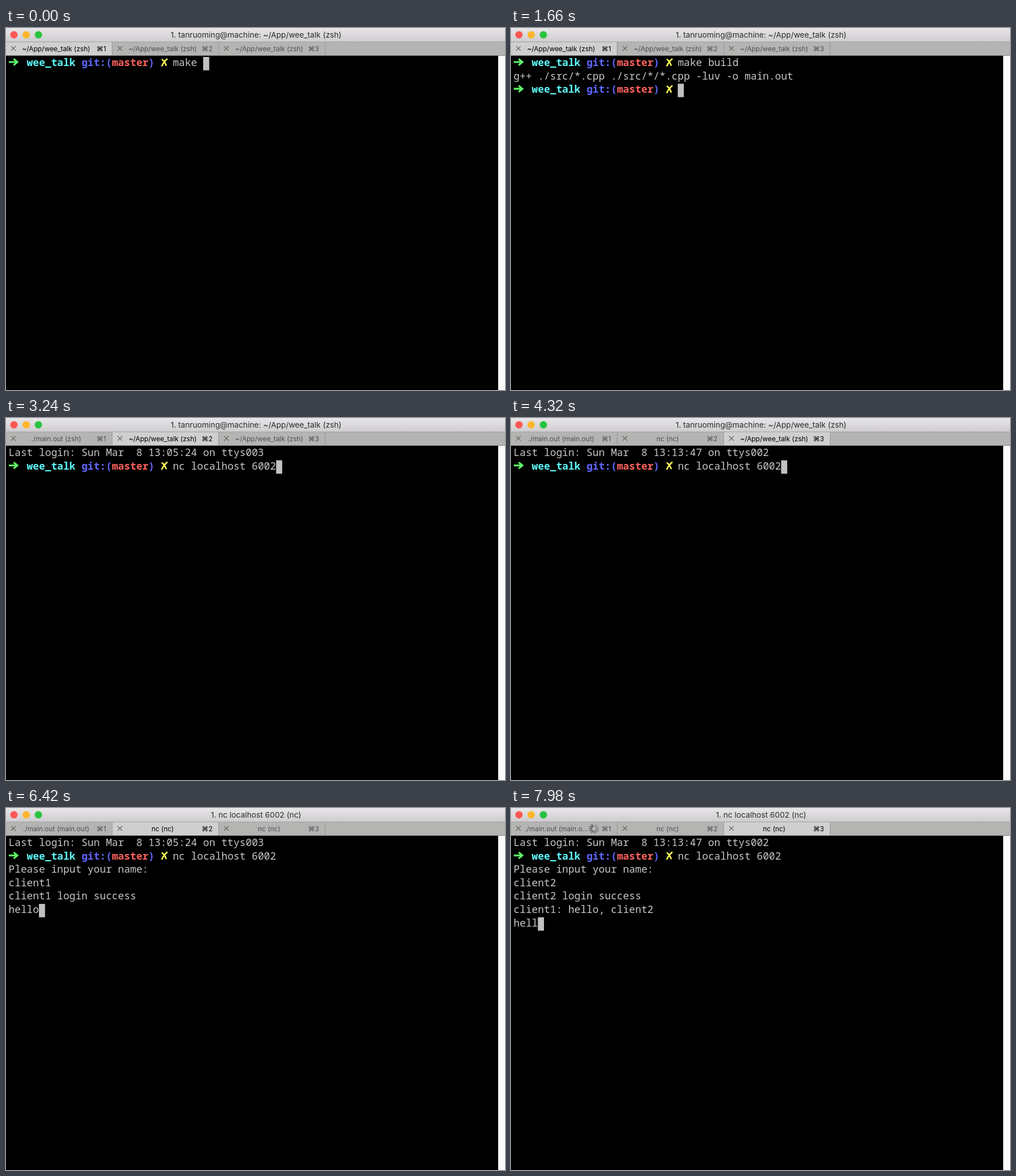
Animation of 878 by 638 pixels, one loop 8000 ms. Source, as an HTML page:

```html
<!DOCTYPE html>
<html lang="en">
<head>
<meta charset="utf-8">
<title>Terminal chat</title>
<style>
  html, body { margin: 0; width: 100%; height: 100%; overflow: hidden; background: #000; }
  svg { display: block; width: 100%; height: 100%; }
  text { white-space: pre; }
  .ui { font-family: Inter, "DejaVu Sans", sans-serif; font-size: 11.9px; }
  .title { font-size: 13.7px; fill: #2c2c2c; }
  .mono { font-family: "Noto Sans Mono", "DejaVu Sans Mono", monospace; font-size: 17.83px; fill: #c7c7c7; }
  .bold { font-weight: 700; }
</style>
</head>
<body>
<svg viewBox="0 0 878 638" preserveAspectRatio="none">
  <defs>
    <linearGradient id="bar" x1="0" y1="0" x2="0" y2="1">
      <stop offset="0" stop-color="#e8e6e8"/>
      <stop offset="1" stop-color="#cecccf"/>
    </linearGradient>
  </defs>
  <rect width="878" height="638"/>
  <rect width="878" height="24" fill="url(#bar)"/>
  <circle cx="14" cy="12" r="6.5" fill="#fc5753"/>
  <circle cx="35.5" cy="12" r="6.5" fill="#fdb62c"/>
  <circle cx="57" cy="12" r="6.5" fill="#29c440"/>
  <rect y="24" width="878" height="25" fill="#b4b4b3"/>
  <rect x="866" y="49" width="12" height="589" fill="#fafafa"/>
  <g id="view"></g>
</svg>
<script>
const LOOP = 8000, CELL = 10.7, LEFT = 4.5, ROW = 23.6, TAB = 187.4;
const DIR = 'wee_talk', HOME = `~/App/${DIR} (zsh)`;
const SHELL = `tanruoming@machine: ${HOME}`;
const NC = 'nc localhost 6002';
const view = document.getElementById('view');

const typed = (s, t, start, step) =>
  s.slice(0, Math.max(0, Math.floor((t - start) / step) + 1));

// Last entry whose start time has passed
const at = (t, steps) => steps.filter(([start]) => t >= start).pop()[1];

const prompt = cmd => ({ cmd });

function buildTab(t) {
  const lines = [prompt('make ' + typed('build', t, 120, 80))];
  if (t >= 640) lines.push('g++ ./src/*.cpp ./src/*/*.cpp -luv -o main.out');
  if (t >= 1400) lines.push(prompt(t < 2200 ? typed('./mai', t, 1700, 90) : './main.out '));
  else if (t >= 600) lines.push('');
  if (t >= 2560) lines.push('');
  return lines;
}

function chatTab(t, tty, recall, enter, name, start, step, login) {
  const lines = [`Last login: Sun Mar  8 ${tty}`, prompt(t < recall ? '' : NC)];
  if (t >= enter) lines.push('Please input your name:', typed(name, t, start, step));
  if (t >= login) lines.push(`${name} login success`);
  return lines;
}

function firstClient(t) {
  const lines = chatTab(t, '13:05:24 on ttys003', 3060, 3380, 'client1', 3480, 55, 3920);
  if (t >= 3920) {
    lines.push(typed('hello', t, 6090, 80) + typed(', client2', t, 6490, 72));
    if (t >= 7220) lines.push('');
  }
  return lines;
}

function secondClient(t) {
  const lines = chatTab(t, '13:13:47 on ttys002', 4280, 4440, 'client2', 4660, 90, 5380);
  if (t >= 7220) lines.push('client1: hello, client2');
  if (t >= 5380) lines.push(typed('hello', t, 7690, 80));
  return lines;
}

const text = (x, y, s, attrs = '') => `<text x="${x}" y="${y}" ${attrs}>${s}</text>`;
const mono = (col, row, s, color) =>
  text(LEFT + col * CELL, 67 + row * ROW, s,
    color ? `class="mono bold" style="fill:${color}"` : 'class="mono"');

function drawLine(line, row) {
  if (typeof line === 'string') return mono(0, row, line);
  return `<g transform="translate(0 ${row * ROW})" fill="none">
    <path d="M5 60H19M13.5 54.5L20 60L13.5 65.5" stroke="#5ffa68" stroke-width="3.2"/>
    <path d="M274 67.5Q277 60 284 54M274 55Q279 58 282 66.5" stroke="#fefb55" stroke-width="2.6"/></g>` +
    mono(3, row, DIR, '#5ffdff') + mono(12, row, 'git:(', '#6068ff') +
    mono(17, row, 'master', '#ff625e') + mono(23, row, ')', '#6068ff') +
    mono(27, row, line.cmd);
}

function drawScreen(lines) {
  const row = lines.length - 1, last = lines[row];
  const col = last.cmd === undefined ? last.length : 27 + last.cmd.length;
  return lines.map(drawLine).join('') +
    `<rect x="${LEFT + col * CELL}" y="${51 + row * ROW}" width="${CELL}" height="${ROW}" fill="#c1c1c1"/>`;
}

function drawSpinner(t) {
  const turn = Math.floor(t / 83);
  let out = '';
  for (let i = 0; i < 12; i++) {
    const fade = 0.2 + 0.7 * ((i - turn % 12 + 12) % 12) / 11;
    out += `<path d="M0 -4.2V-8" transform="translate(146 36.5) rotate(${i * 30})" stroke="#222" stroke-width="1.6" stroke-linecap="round" opacity="${fade}"/>`;
  }
  return out;
}

function drawTab(name, i, active, busy) {
  const x = i * TAB, ink = `fill="${active ? '#000' : '#505050'}"`;
  const shift = busy ? 80 : 88.3;
  return (active ? `<rect x="${x}" y="24" width="${TAB - 1}" height="25" fill="#d0cfd0"/>` : '') +
    `<path d="M${x + TAB - 0.5} 24V49" stroke="#969696"/>
     <path d="M${x + 9} 32l8 8m0 -8l-8 8" stroke="#66665c" stroke-width="1.1"/>` +
    text(x + shift, 40.6, name, `class="ui" text-anchor="middle" ${ink}`) +
    text(x + 176, 40.6, '⌘' + (i + 1), `class="ui" text-anchor="end" ${ink}`);
}

function render(t) {
  const active = at(t, [[0, 0], [2760, 1], [4200, 2], [5900, 1], [7560, 2]]);
  const busy = t >= 7260;
  const names = [
    at(t, [[0, HOME], [700, 'make (clang)'], [1400, HOME], [2600, './main.out (zsh)'],
      [3340, './main.out (main.out)'], [7260, './main.out (main.o…']]),
    t < 3400 ? HOME : 'nc (nc)',
    t < 4480 ? HOME : 'nc (nc)'
  ];
  const title = [
    at(t, [[0, SHELL], [700, 'make build (clang)'], [1400, SHELL], [2600, './main.out (zsh)']]),
    t < 3400 ? SHELL : `${NC} (nc)`,
    t < 4480 ? SHELL : `${NC} (nc)`
  ][active];
  const lines = [buildTab, firstClient, secondClient][active](t);
  return text(440, 17, '1. ' + title, 'class="ui title" text-anchor="middle"') +
    names.map((name, i) => drawTab(name, i, i === active, busy && i === 0)).join('') +
    '<path d="M0 24.5H878" stroke="#a4a3a4"/><path d="M0 48.5H878" stroke="#868686"/>' +
    (busy ? drawSpinner(t) : '') + drawScreen(lines);
}

let shown = '';
function frame() {
  const next = render(performance.now() % LOOP);
  if (next !== shown) view.innerHTML = shown = next;
  requestAnimationFrame(frame);
}
frame();
</script>
</body>
</html>
```
